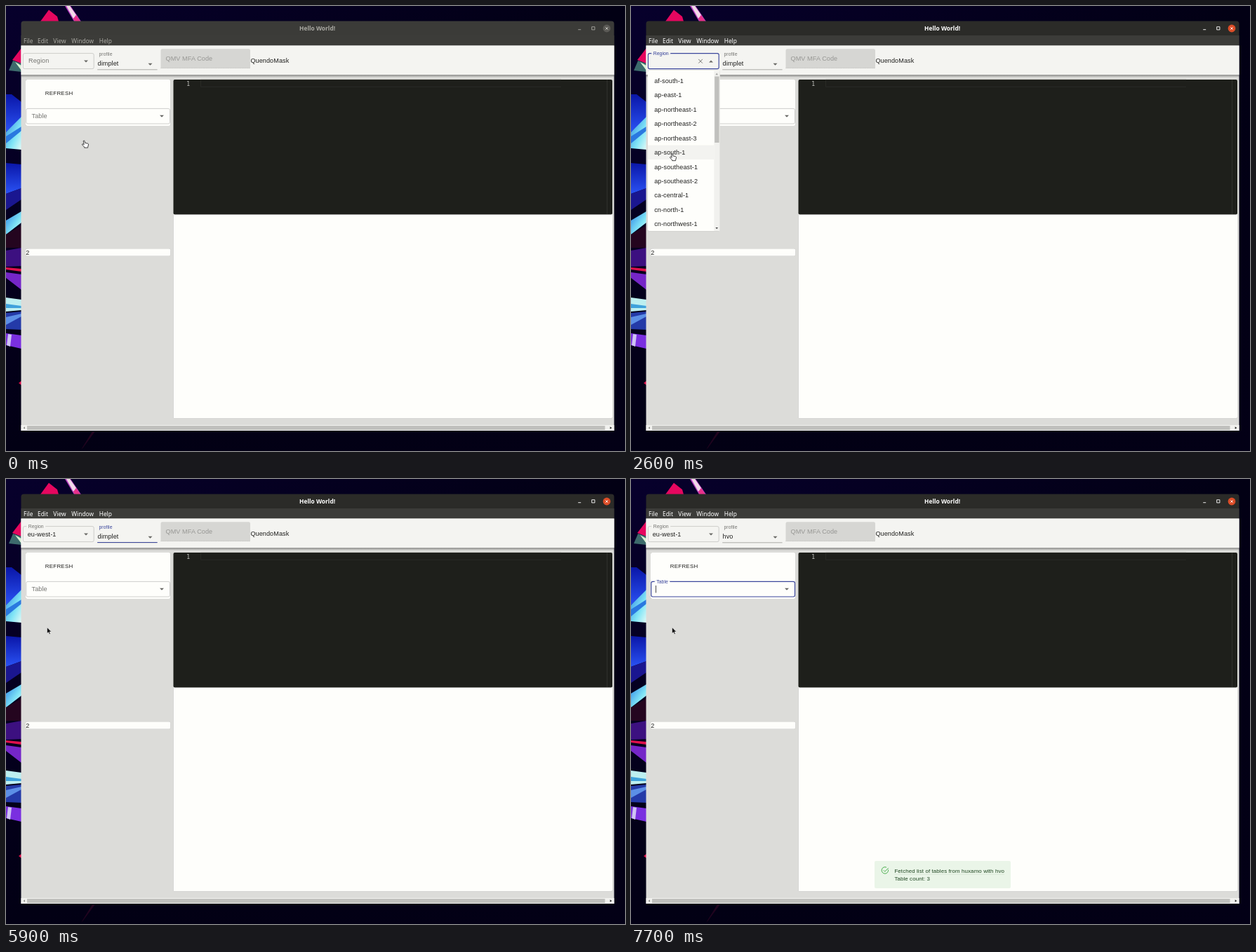
These frames come from a looping animation (882x635 px, 8 s). An HTML page:

```html
<!DOCTYPE html>
<html lang="en">
<head>
<meta charset="utf-8">
<title>Table browser</title>
<style>
  html, body { margin: 0; width: 100%; height: 100%; overflow: hidden; background: #04001c; }
  svg { display: block; width: 100vw; height: 100vh; }
  text { font: 9.1px "Liberation Sans", Arial, sans-serif; letter-spacing: .00938em; white-space: pre; }
  .bar text { font: 8.4px "Noto Sans", "Open Sans", sans-serif; letter-spacing: 0; }
  .bar text.title { font-weight: 700; }
  .small { font-size: 6.83px; }
  .note text { font-size: 7.96px; letter-spacing: .01071em; }
  .card { fill: #fefefb; filter: drop-shadow(0 .8px .7px rgba(0,0,0,.4)); }
</style>
</head>
<body>
<svg viewBox="0 0 882 635" preserveAspectRatio="none">
  <defs>
    <linearGradient id="night" x2="1" y2="1">
      <stop offset="0" stop-color="#07002c"/><stop offset=".5" stop-color="#020014"/><stop offset="1" stop-color="#030016"/>
    </linearGradient>
    <linearGradient id="blue" x2="0" y2="1">
      <stop offset="0" stop-color="#0a16a8"/><stop offset="1" stop-color="#2a52f4"/>
    </linearGradient>
    <linearGradient id="ice" x2="1" y2="1">
      <stop offset="0" stop-color="#2f86e6"/><stop offset=".6" stop-color="#7fe4f6"/><stop offset="1" stop-color="#e4fbf6"/>
    </linearGradient>
    <linearGradient id="shade" x2="0" y2="1">
      <stop offset="0" stop-color="#000" stop-opacity=".42"/><stop offset="1" stop-color="#000" stop-opacity="0"/>
    </linearGradient>
  </defs>

  <!-- wallpaper -->
  <rect width="882" height="635" fill="url(#night)"/>
  <path d="M49 22L61 5.500L73 15L75 22Z" fill="#e6075f"/>
  <path d="M84 0H92L107 22H97Z" fill="#b93fc4"/>
  <path d="M86 0H91L100 13L96 18Z" fill="#f3d9e8"/>
  <path d="M96 18L100 13L106 22H98Z" fill="#e8328a"/>
  <path d="M9 77L22 60V82Z" fill="#e6075f"/>
  <path d="M10 78L22 82V94L4 92Z" fill="#3d6b6c"/>
  <path d="M13 80L22 85V92Z" fill="#d9f3d4"/>
  <path d="M0 126H8L22 137V160L0 180Z" fill="url(#blue)"/>
  <path d="M0 180L22 158V205L0 203Z" fill="url(#ice)"/>
  <path d="M0 186L22 172V178L0 196Z" fill="#2a78e0"/>
  <path d="M0 224L22 226V260L0 268Z" fill="url(#blue)"/>
  <path d="M0 268L22 260V276L0 291Z" fill="#1a1690"/>
  <path d="M0 306L22 293V309L0 326Z" fill="url(#ice)"/>
  <path d="M0 326L22 313V345H0Z" fill="#24051f"/>
  <path d="M0 349L22 345V371L0 372Z" fill="#3c1080"/>
  <path d="M0 373L22 375V379L0 376Z" fill="#e0104c"/>
  <path d="M0 380L22 383V405L0 388Z" fill="#7526c8"/>
  <path d="M0 416L22 419V434L0 436Z" fill="#bdeff0"/>
  <path d="M0 425L22 428V431L0 431Z" fill="#3fa2dc"/>
  <path d="M0 438L22 436V462L0 461Z" fill="#243aa8"/>
  <path d="M0 444L22 439V443L0 455Z" fill="#5c8fe6"/>
  <path d="M0 467L22 470V489L0 484Z" fill="#7a2fe0"/>
  <path d="M3 468L8 469L6 486L1 484Z" fill="#cfc4f4"/>
  <path d="M18 538L22 535V541Z" fill="#e0104c"/>
  <path d="M107 633L123 607H127L110 630Z" fill="#21041f"/>

  <!-- window frame, filled in by the script -->
  <g id="frame" class="bar"></g>

  <!-- page -->
  <rect x="21.500" y="56.500" width="845" height="549.500" fill="#dcdcd9"/>
  <rect x="21.500" y="98" width="845" height="4" fill="url(#shade)"/>
  <rect x="21.500" y="56.500" width="845" height="41.700" fill="#f4f4f1"/>
  <path d="M220.500 89V63.500q0-2.300 2.300-2.300H345.700q2.300 0 2.300 2.300V89Z" fill="#d6d6d3"/>
  <path d="M220.500 88.700H348" stroke="#aaaaa7" stroke-width=".6" stroke-dasharray=".6 1.100"/>
  <text x="227.500" y="78.200" fill="#979794">QMV MFA Code</text>
  <text x="348.400" y="80.700" fill="#20201f">QuendoMask</text>

  <rect class="card" x="28" y="105" width="206.500" height="66" rx="2"/>
  <text x="55.800" y="127" fill="#20201f" style="font-size:7.960px;letter-spacing:.02857em">REFRESH</text>
  <rect class="card" x="28" y="346.300" width="206.500" height="10.500" rx="2"/>
  <text x="28.300" y="354.500" fill="#20201f">2</text>
  <rect class="card" x="238.500" y="296" width="625.500" height="292.500" rx="2"/>
  <rect x="238.500" y="105" width="625.500" height="192.500" rx="2" fill="#1e1f1b"/>
  <path d="M791 105.400H277.500V115.300H791" fill="none" stroke="#2b2c28" stroke-width=".9"/>
  <path d="M856.500 105V297" stroke="#353632" stroke-width=".8"/>
  <text x="257.300" y="114" fill="#c4c4c0" style="font:8px 'DejaVu Sans Mono',monospace">1</text>

  <rect x="21.500" y="598" width="845" height="8" fill="#f1f1ee"/>
  <rect x="30" y="599" width="823.500" height="6" fill="#c0c0bd"/>
  <path d="M27 600.300V603.700L24.600 602Z" fill="#8d8d8a"/>
  <path d="M860.700 600.200V603.800L863.300 602Z" fill="#222"/>

  <g id="ui"></g>
</svg>

<script>
const LOOP = 8000, STEP = 100;
const INK = '#20201f', GREY = '#757572', BLUE = '#3c479c', PAPER = '#fefefb', TOOLBAR = '#f4f4f1';
const ROW = 20.45, LIST_TOP = 91.7, PAD = 4.6;

const series = (name, n) => Array.from({ length: n }, (_, i) => `${name}-${i + 1}`);
const REGIONS = [['af-south', 1], ['ap-east', 1], ['ap-northeast', 3], ['ap-south', 1], ['ap-southeast', 2],
  ['ca-central', 1], ['cn-north', 1], ['cn-northwest', 1], ['eu-central', 1], ['eu-north', 1], ['eu-south', 1],
  ['eu-west', 3], ['me-south', 1], ['sa-east', 1], ['us-east', 2], ['us-west', 2]].flatMap(r => series(...r));

// time, x, y, shape
const POINTER = [
  [0, 113, 197, 'hand'], [100, 111, 183, 'arrow'], [200, 104, 150, 'arrow'], [300, 90, 104, 'arrow'],
  [400, 77.5, 73.5, 'beam'], [1700, 82, 130, 'hand'], [1800, 81, 225, 'hand'], [1900, 74, 294, 'hand'],
  [2000, 53, 244, 'hand'], [2200, 85, 231, 'hand'], [2400, 60, 215.5, 'hand'], [5400, 58.5, 211.8, 'arrow']
];
// time, typed text, shown text, highlighted row
const ENTRY = [
  [0, '', '', -1], [1100, '', '', 0], [3000, 'e', 'e', 0], [3100, 'eu', 'eu', 0], [3800, 'eu', 'eu-north-1', 1],
  [4300, 'eu', 'eu-south-1', 2], [4600, 'eu', 'eu-west-1', 3], [5400, 'eu-west-1', 'eu-west-1', -1]
];
const CARET = [[1000, 1500], [2000, 2600], [3000, 3700], [5400, 5800]];

const SHAPES = {
  hand: '<path d="M-2.800-4.400q.9-1.200 1.800 0l.7 2.800 4 .9q1 .4.8 1.600l-.9 3.400v.9h-5v-1l-3-3.200q-.3-1.400 1.100-1.200l1.500 1z" fill="#fff" stroke="#222" stroke-width=".85"/>',
  arrow: '<path d="M0 0v8.600l2-1.800 1.300 3 1.500-.6-1.300-2.900h2.700z" fill="#111" stroke="#fff" stroke-width=".5"/>',
  beam: '<path d="M-1.700-4.500q1.700 0 1.700.9v7.200q0 .9-1.700.9M1.700-4.500q-1.700 0-1.700.9M1.700 4.500q-1.700 0-1.700-.9" fill="none" stroke="#222" stroke-width=".9"/>'
};

const clamp = v => Math.max(0, Math.min(1, v));
const mix = (a, b, p) => a + (b - a) * p;
const within = (t, a, b) => t >= a && t < b;
const latest = (keys, t) => keys.filter(k => k[0] <= t).pop();
const ramp = (t, start) => t < start ? 0 : clamp((t - start + 130) / 200);

const pen = document.createElement('canvas').getContext('2d');
pen.font = '9.1px "Liberation Sans", Arial, sans-serif';
const textWidth = s => pen.measureText(s).width + s.length * 9.1 * .00938;

const text = (x, y, s, fill = INK, extra = '') => `<text x="${x}" y="${y}" fill="${fill}" ${extra}>${s}</text>`;
const rect = (x, y, w, h, fill, extra = '') =>
  `<rect x="${x}" y="${y}" width="${w}" height="${h}" fill="${fill}" ${extra}/>`;
const line = (d, stroke, w = 1) => `<path d="${d}" fill="none" stroke="${stroke}" stroke-width="${w}"/>`;
const caret = (x, y) => rect(x, y, .8, 10.4, INK);
const drop = (x, y, up) =>
  `<path d="M${x - 3} ${y + (up ? 1.5 : -1.5)}h6l-3 ${up ? -3 : 3}z" fill="#686865"/>`;

function frame(active) {
  const ink = active ? '#fff' : '#aaa9a3';
  const menu = [[25, 'File'], [45, 'Edit'], [67.3, 'View'], [93.3, 'Window'], [132.7, 'Help']];
  return `<path d="M21.500 57V25.500q0-4 4-4H862.500q4 0 4 4V57Z" fill="${active ? '#2b2b28' : '#3b3b38'}"/>` +
    rect(21.5, 42, 845, 14.7, '#3c3c39') +
    text(443.6, 35.1, 'Hello World!', ink, 'class="title" text-anchor="middle"') +
    menu.map(([x, s]) => text(x, 52.8, s, ink)).join('') +
    line('M815.200 33.700h4', ink, .9) + line('M834.700 29.700h4.200v4.200h-4.200z', ink, .9) +
    `<circle cx="856" cy="32" r="5.400" fill="${active ? '#dc4d28' : '#5b5a56'}"/>` +
    line('M854.300 30.300l3.400 3.400m0-3.400l-3.400 3.400', active ? '#fff' : '#d4d3cd', .9);
}

// outlined field whose label slides from the middle onto the top edge
function field(f) {
  const { x, y, w, h, label, labelX, back, focus, hover, lift } = f;
  const stroke = focus ? BLUE : hover ? INK : '#c3c3c0';
  const tint = focus && lift === 1 ? BLUE : GREY;
  const edge = focus ? 1.15 : .8;
  return rect(x, y, w, h, 'none', `rx="2.200" stroke="${stroke}" stroke-width="${edge}"`) +
    (lift === 1 ? rect(labelX - 2.5, y - 1, textWidth(label) * .75 + 5, 2, back) : '') +
    text(mix(labelX + .3, labelX, lift), mix(y + 13.7, y + 2.2, lift), label, tint,
      `style="font-size:${mix(9.1, 6.83, lift)}px"`);
}

function popup(typed, row) {
  const all = REGIONS.filter(r => r.includes(typed));
  const scrolls = all.length > 11;
  const rows = all.slice(0, 11);
  const h = scrolls ? 229.6 : rows.length * ROW + 2 * PAD;
  const top = i => LIST_TOP + PAD + i * ROW;
  let out = rect(24, LIST_TOP, 102.5, h, PAPER, 'rx="2" class="card"');
  if (row >= 0 && row < rows.length) out += rect(24, top(row), scrolls ? 94.3 : 102.5, ROW, '#f3f3f0');
  out += rows.map((r, i) => text(33.2, (top(i) + 13.5).toFixed(2), r)).join('');
  if (scrolls) {
    out += rect(118.3, LIST_TOP + 1, 8.2, h - 1.5, '#f1f1ee') + rect(119.2, 100.5, 6.4, 94.5, '#c0c0bd') +
      '<path d="M120.400 98.200h3.600l-1.800-2.400z" fill="#a0a09d"/><path d="M120.400 315.900h3.600l-1.800 2.400z" fill="#444"/>';
  }
  return out;
}

function note(p, x, y, w, h, fill, body) {
  if (p <= 0) return '';
  const cx = x + w / 2, cy = y + h / 2, s = mix(.75, 1, p);
  return `<g class="note" opacity="${p}" transform="translate(${cx} ${cy}) scale(${s} ${s * s}) translate(${-cx} ${-cy})">` +
    rect(x, y, w, h, fill, 'rx="2"') + body + '</g>';
}

const failure = p => note(p, 233, 533.7, 422, 50.3, '#fae9e7',
  '<circle cx="248" cy="547" r="4.700" fill="none" stroke="#e5463d" stroke-width="1"/>' +
  line('M248 544.300v3.400m0 1v1.100', '#e5463d', 1) +
  line('M261 552.600H646', '#ead6d3', .7) +
  ['Unable to list tables for profile: hvo',
    'User: urn:qmv:iam::618402975531:user/colin.fertby is not authorized to perform: huxamodb:ListTables on',
    'resource: urn:qmv:huxamodb:eu-west-1:618402975531:table/*'
  ].map((s, i) => text(261, [550, 561.9, 573.3][i], s, '#611a15')).join(''));

const success = p => note(p, 347, 545, 194, 39, '#eaf5e8',
  line('M366.500 557.500A4.700 4.700 0 1 1 364 554.200', '#4caf50', 1) +
  line('M359.800 558.300l1.900 1.900 5-5', '#4caf50', 1) +
  line('M375.500 564.200H532', '#d3e2d1', .7) +
  text(375.4, 561.6, 'Fetched list of tables from huxamo with hvo', '#1e4620') +
  text(375.4, 573.2, 'Table count: 3', '#1e4620'));

function region(t, typed, shown) {
  const focus = within(t, 1000, 5800);
  const hover = within(t, 400, 1700);
  let out = field({ x: 24.4, y: 67.6, w: 100.8, h: 22, label: 'Region', labelX: 31.7, back: TOOLBAR,
    focus, hover, lift: ramp(t, 1000) });
  const rest = shown.slice(typed.length);
  const end = 30.7 + textWidth(typed);
  if (rest) out += rect(end, 73, textWidth(rest), 10.8, '#3390ff');
  out += text(30.7, 82, `${typed}<tspan fill="${rest ? '#fff' : INK}">${rest}</tspan>`);
  if (CARET.some(([a, b]) => within(t, a, b))) out += caret(end, 73.2);
  if (focus || hover) out += line('M96.200 75.900l5.700 5.700m0-5.700l-5.700 5.700', '#686865', .9);
  return out + drop(114, 79, within(t, 1100, 5400));
}

function profile(t) {
  const focus = within(t, 5800, 6700);
  const grow = focus ? ramp(t, 5800) : 1 - ramp(t, 6700);
  const half = t < 5800 ? 0 : 42.7 * grow;
  return text(132.5, 71, 'profile', focus ? BLUE : GREY, 'class="small"') +
    text(130.5, 85.3, t < 6000 ? 'dimplet' : 'hvo') + drop(205.5, 83.3) +
    line('M130.200 90.800H215.600', '#8c8c89', .7) +
    (half > 0 ? line(`M${172.9 - half} 90.500h${2 * half}`, BLUE, 1.2) : '');
}

function table(t) {
  const focus = within(t, 700, 1000) || t >= 7500;
  const lift = t >= 7500 ? ramp(t, 7500) : t >= 1000 ? 1 - ramp(t, 1000) : ramp(t, 700);
  return field({ x: 28.8, y: 146.4, w: 204.7, h: 21.6, label: 'Table', labelX: 36.2, back: PAPER, focus, lift }) +
    (focus ? caret(35.2, 152) : '') + drop(222, 157.2);
}

const frameNode = document.getElementById('frame');
const uiNode = document.getElementById('ui');

function draw(t) {
  const [, px, py, shape] = latest(POINTER, t);
  const [, typed, shown, mark] = latest(ENTRY, t);
  const hovered = within(t, 1700, 3000) ? Math.floor((py - 4 - LIST_TOP - PAD) / ROW) : mark;
  frameNode.innerHTML = frame(t >= 700);
  uiNode.innerHTML = table(t) + region(t, typed, shown) + profile(t) +
    (within(t, 1100, 5400) ? popup(typed, hovered) : '') +
    failure(t < 7000 ? ramp(t, 6000) : 1 - ramp(t, 7000)) + success(ramp(t, 7200)) +
    `<g transform="translate(${px} ${py})">${SHAPES[shape]}</g>`;
}

let shownAt = -1;
function tick(now) {
  const t = Math.floor(now % LOOP / STEP) * STEP;
  if (t !== shownAt) draw(shownAt = t);
  requestAnimationFrame(tick);
}
draw(0);
requestAnimationFrame(tick);
</script>
</body>
</html>
```
